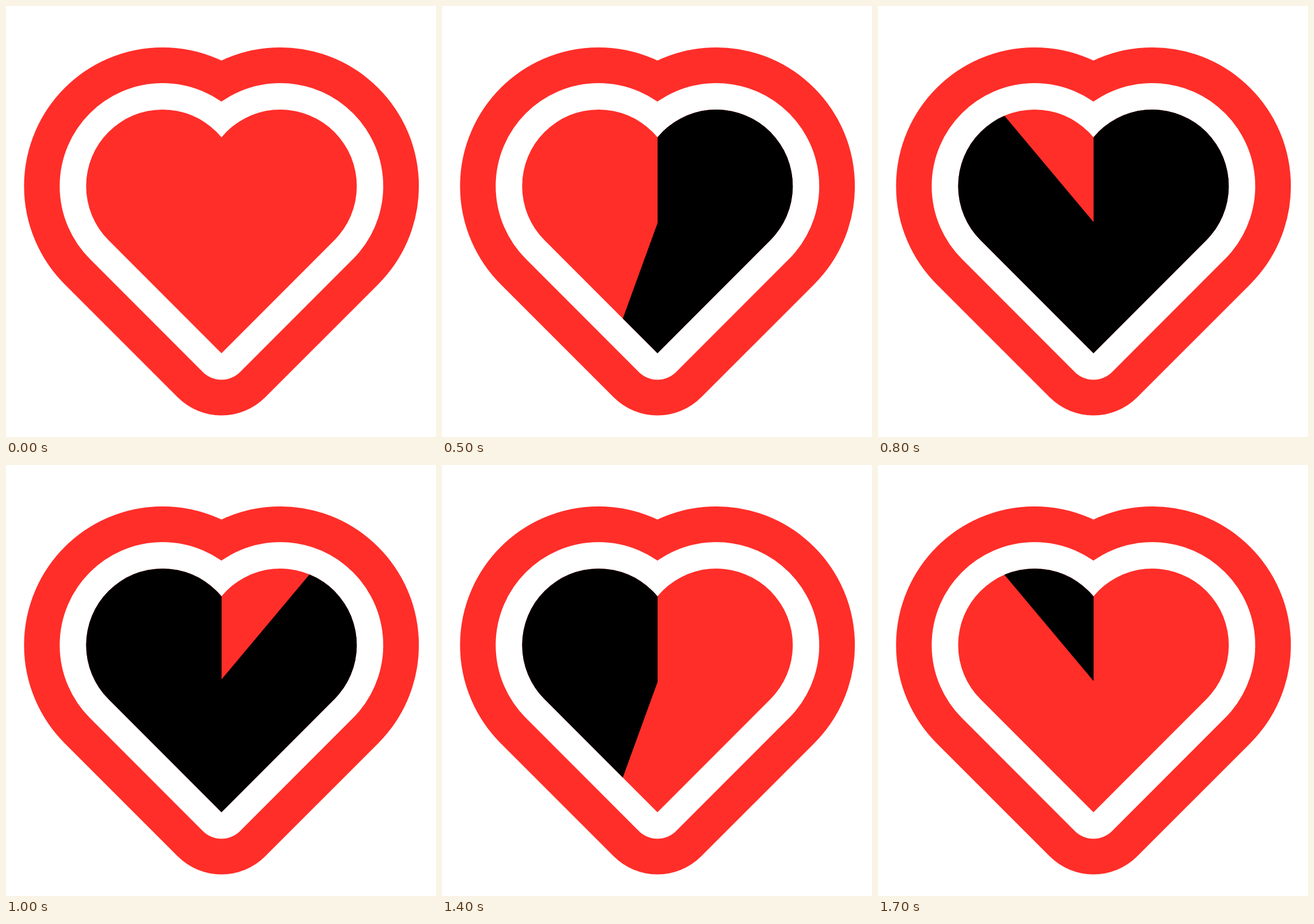
Recreate the animation shown at these times as an HTML page with a canvas. Size 748 by 749 pixels, loop 1.8 s.

```html
<!DOCTYPE html>
<html lang="en">
<head>
<meta charset="utf-8">
<title>Heart timer</title>
<style>
  html, body { margin: 0; width: 100%; height: 100%; overflow: hidden; background: #fff; }
  canvas { display: block; }
</style>
</head>
<body>
<canvas id="stage" width="748" height="749"></canvas>
<script>
  const ctx = document.getElementById('stage').getContext('2d');
  const RED = '#ff2e29';
  const STEP = 100, STEPS = 18, TURN = 9;
  const PIVOT = { x: 375, y: 374 };
  const LAG = 1; // the moving edge trails its ray by one pixel

  function heartPath() {
    const mid = 374.8, cy = 313, r = 133, gap = 102.4;
    const tip = cy + r * Math.SQRT2 + gap;
    const notch = Math.acos(gap / r);
    const p = new Path2D();
    p.moveTo(mid, tip);
    p.arc(mid - gap, cy, r, Math.PI * 0.75, -notch);
    p.arc(mid + gap, cy, r, Math.PI + notch, Math.PI * 0.25);
    p.closePath();
    return p;
  }

  const heart = heartPath();

  function outline(color, width) {
    ctx.strokeStyle = color;
    ctx.lineWidth = width;
    ctx.stroke(heart);
  }

  // Black slice between twelve o'clock and the hand, on either side of it.
  function slice(angle, remaining) {
    const y = PIVOT.y - LAG / Math.sin(angle);
    const top = -Math.PI / 2;
    ctx.beginPath();
    ctx.moveTo(PIVOT.x, y);
    ctx.arc(PIVOT.x, y, 700, top, top + angle, remaining);
    ctx.closePath();
    ctx.fill();
  }

  function draw(step) {
    ctx.fillStyle = '#fff';
    ctx.fillRect(0, 0, 748, 749);
    ctx.lineJoin = 'round';
    outline(RED, 216);
    outline('#fff', 92);
    ctx.fillStyle = RED;
    ctx.fill(heart);
    if (step === 0) return;

    ctx.fillStyle = '#000';
    if (step === TURN) {
      ctx.fill(heart);
      return;
    }
    ctx.save();
    ctx.clip(heart);
    slice((step % TURN) / TURN * 2 * Math.PI, step > TURN);
    ctx.restore();
  }

  let shown = -1;
  function tick() {
    const step = Math.floor(performance.now() / STEP) % STEPS;
    if (step !== shown) draw(shown = step);
    requestAnimationFrame(tick);
  }
  tick();
</script>
</body>
</html>
```
